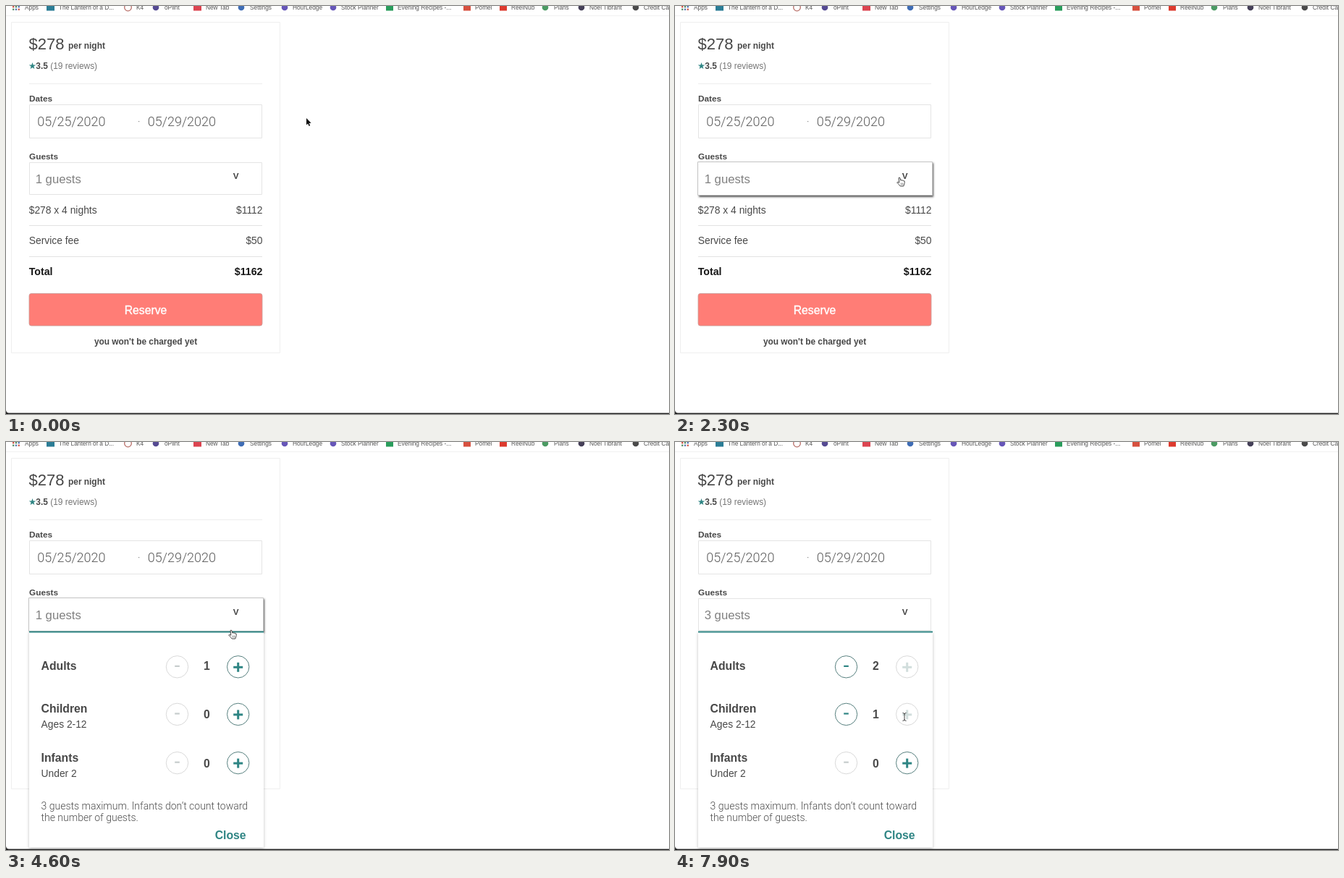
Write an HTML page with a canvas that moves like this. It is 916 px wide and 564 px high and loops after 8000 ms.

```html
<!DOCTYPE html>
<html lang="en">
<head>
<meta charset="utf-8">
<title>Booking card</title>
<style>
  html, body { margin: 0; width: 100%; height: 100%; overflow: hidden; background: #fff; }
  canvas { display: block; }
</style>
</head>
<body>
<canvas id="stage" width="916" height="564"></canvas>
<script>
const ctx = document.getElementById('stage').getContext('2d');
const LOOP = 8000, STEP = 100;
const SANS = '"Liberation Sans", Arial, sans-serif';
const LIGHT = 'Roboto, "Liberation Sans", sans-serif';
const TEAL = '#2f8584', DARK = '#484848';
const OPEN_AT = 3700, ADULT_AT = 5400, CHILD_AT = 7200;

// time, x, y of the pointer hotspot
const PATH = [
  [0, 415, 155], [300, 413, 156], [1200, 226, 218], [1500, 250, 225],
  [2200, 309, 237], [3500, 310, 237], [4000, 310, 240], [4600, 310, 260],
  [5100, 319, 309], [5800, 319, 310], [6400, 317, 342], [6900, 317, 379], [8000, 317, 380]
];

const BOOKMARKS = [
  ['Apps', 26], ['The Lantern of a D...', 73], ['K4', 180], ['oPlint', 219],
  ['New Tab', 276], ['Settings', 337], ['HourLedge', 396], ['Stock Planner', 463],
  ['Evening Recipes -...', 541], ['Pomel', 648], ['ReelNub', 698], ['Plans', 757],
  ['Noel Tibrant', 806], ['Credit Ca', 881]
];
const DOTS = [[207, '#554a92'], [325, '#3f6db5'], [385, '#6656b8'], [452, '#6656b8'],
  [745, '#4b9a63'], [795, '#454058'], [870, '#4a4a4a']];
const SQUARES = [[56, 11, '#2b7d96'], [259, 11, '#dc4450'], [525, 10, '#2a9d5c'],
  [632, 10, '#d7503f'], [682, 10, '#dd3a2e']];

function text(str, x, y, size, color = DARK, weight = 400, align = 'left', family = SANS) {
  ctx.font = `${weight} ${size}px ${family}`;
  ctx.fillStyle = color;
  ctx.textAlign = align;
  ctx.fillText(str, x, y);
}

function fill(x, y, w, h, color) {
  ctx.fillStyle = color;
  ctx.fillRect(x, y, w, h);
}

function frame(x, y, w, h, color) {
  ctx.strokeStyle = color;
  ctx.lineWidth = 1;
  ctx.strokeRect(x + 0.5, y + 0.5, w - 1, h - 1);
}

function disc(x, y, r, color) {
  ctx.beginPath();
  ctx.arc(x, y, r, 0, Math.PI * 2);
  ctx.fillStyle = color;
  ctx.fill();
}

function ring(x, y, r, color, width = 1) {
  ctx.beginPath();
  ctx.arc(x, y, r, 0, Math.PI * 2);
  ctx.strokeStyle = color;
  ctx.lineWidth = width;
  ctx.stroke();
}

function withShadow(color, blur, dx, dy, draw) {
  ctx.save();
  Object.assign(ctx, { shadowColor: color, shadowBlur: blur, shadowOffsetX: dx, shadowOffsetY: dy });
  draw();
  ctx.restore();
}

function polygon(points, x, y) {
  ctx.beginPath();
  points.forEach(([px, py]) => ctx.lineTo(x + px, y + py));
  ctx.closePath();
}

function star(x, y, r) {
  const points = Array.from({ length: 10 }, (_, i) => {
    const a = i * Math.PI / 5 - Math.PI / 2, d = i % 2 ? r * 0.4 : r;
    return [Math.cos(a) * d, Math.sin(a) * d];
  });
  polygon(points, x, y);
  ctx.fillStyle = TEAL;
  ctx.fill();
}

function bookmarkBar() {
  const tints = ['#d2584b', '#5a8f66', '#5577b5'];
  for (let i = 0; i < 6; i++) {
    fill(9 + (i % 3) * 3.8, i < 3 ? 0 : 3.6, 2.3, 2.3, tints[(i + (i > 2)) % 3]);
  }
  DOTS.forEach(([x, color]) => disc(x, 2, 4.3, color));
  SQUARES.forEach(([x, w, color]) => fill(x, 0, w, 6.5, color));
  ring(168.5, 2, 4.8, '#b9706a', 1.3);
  BOOKMARKS.forEach(([label, x]) => text(label, x, 5, 8.3, '#555'));
  fill(0, 13, 916, 1, '#f1f1f1');
}

function header() {
  frame(7, 22, 372, 458, '#efefef');
  text('$278', 31.5, 60, 22);
  text('per night', 86, 59, 11.9, DARK, 700);
  star(36.5, 83, 5);
  text('3.5', 41.3, 86.5, 11.9, DARK, 700);
  text('(19 reviews)', 61.3, 86.5, 11.9, '#767676');
  fill(32, 107, 322, 1, '#ededed');

  text('Dates', 32, 132, 11.8, DARK, 700);
  frame(32, 136, 322, 47, '#e4e4e4');
  text('05/25/2020', 43.3, 166.3, 18, '#5c5c5c', 300, 'left', LIGHT);
  text('05/29/2020', 195.8, 166.3, 18, '#5c5c5c', 300, 'left', LIGHT);
  fill(183, 159, 1.2, 1.2, '#888');
  text('Guests', 32, 212, 11.8, DARK, 700);
}

function priceRow(label, price, y, size = 13.85, color = DARK, weight = 400) {
  text(label, 31.7, y, size, color, weight);
  text(price, 354.5, y, size, color, weight, 'right');
}

function summary() {
  priceRow('$278 x 4 nights', '$1112', 286.5);
  fill(32, 303, 322, 1, '#e2e2e2');
  priceRow('Service fee', '$50', 329);
  fill(32, 346, 322, 1, '#e2e2e2');
  priceRow('Total', '$1162', 372, 14.2, '#181818', 700);

  ctx.beginPath();
  ctx.roundRect(32, 397.5, 322, 44.5, 3);
  ctx.fillStyle = '#ff7d76';
  ctx.fill();
  ctx.strokeStyle = '#c79a96';
  ctx.lineWidth = 0.8;
  ctx.stroke();
  text('Reserve', 193, 426, 15.7, '#fff', 400, 'center');
  ctx.strokeStyle = '#fff';
  ctx.lineWidth = 0.4;
  ctx.strokeText('Reserve', 193, 426);
  text("you won't be charged yet", 193, 468.3, 11.9, DARK, 700, 'center');
}

function guestBox(guests, hover) {
  if (hover) {
    withShadow('#555', 2.5, 1.5, 1.5, () => fill(31.5, 215.5, 324, 46.5, '#fff'));
    frame(31, 215, 325, 47, '#c4c4c4');
  } else {
    frame(32, 216, 322, 45, '#e4e4e4');
  }
  text(`${guests} guests`, 40.7, 244.7, 16.7, '#808080');
  text('V', 317.8, 238.7, 11.8, '#444', 700, 'center');
}

function roundButton(x, y, enabled, plus) {
  ring(x, y, 15.2, enabled ? '#567f7e' : '#d9d9d9');
  const color = enabled ? TEAL : plus ? '#d2dedd' : '#c6cccc';
  if (plus) {
    fill(x - 6.5, y - 1, 13, 3, color);
    fill(x - 1.5, y - 6, 3, 13, color);
  } else {
    fill(x - 3.3, y - 2, 6.6, 2.2, color);
  }
}

function counter(label, note, y, value, canDrop, canAdd) {
  text(label, 48.6, note ? y - 2 : y + 4.3, 15.75, DARK, 700);
  if (note) text(note, 48.6, y + 19, 13.8);
  roundButton(236.5, y, canDrop, false);
  text(value, 277.5, y + (note ? 6 : 4.3), 15.75, DARK, 700, 'center');
  roundButton(320.7, y, canAdd, true);
}

function panel(adults, children) {
  const room = adults + children < 3;
  withShadow('rgba(0,0,0,.25)', 4, 0, 1, () => fill(32, 263, 324, 297.5, '#fff'));
  fill(32, 261.5, 324, 2, TEAL);
  counter('Adults', '', 310.8, adults, adults > 1, room);
  counter('Children', 'Ages 2-12', 376.4, children, children > 0, room);
  counter('Infants', 'Under 2', 443.6, 0, false, true);
  text('3 guests maximum. Infants don’t count toward', 48.5, 508, 14, '#4d4d4d', 300, 'left', LIGHT);
  text('the number of guests.', 48.5, 524, 14, '#4d4d4d', 300, 'left', LIGHT);
  text('Close', 288.7, 548.5, 15.75, TEAL, 700);
}

function bottomEdge() {
  fill(0, 562.6, 916, 1.4, '#222');
  polygon([[0, 0], [0, -4], [1, -1.5], [3.5, 0]], 0, 563);
  ctx.fill();
}

const ARROW = [[0, 0], [0, 9.5], [2.1, 7.6], [3.6, 11], [5.2, 10.3], [3.7, 7], [6.6, 6.8]];
const HAND = [[0, 0.6], [1, 0], [2, 0.8], [2.7, 4], [4, 3.6], [5, 4.2], [6.3, 4],
  [7, 4.8], [8, 5], [8.2, 7.5], [7.4, 10], [6.8, 12], [2.2, 12], [0, 9.4],
  [-2.2, 7.2], [-1.6, 6.2], [0.8, 7.2]];

function arrow(x, y) {
  polygon(ARROW, x, y);
  ctx.strokeStyle = '#fff';
  ctx.lineWidth = 1.4;
  ctx.stroke();
  ctx.fillStyle = '#111';
  ctx.fill();
}

function hand(x, y) {
  polygon(HAND, x, y);
  ctx.fillStyle = '#fff';
  ctx.fill();
  ctx.strokeStyle = '#444';
  ctx.lineWidth = 1;
  ctx.stroke();
  fill(x + 3, y + 7.5, 0.8, 3, '#666');
  fill(x + 5, y + 7.5, 0.8, 3, '#666');
}

function beam(x, y) {
  ctx.strokeStyle = '#444';
  ctx.lineWidth = 1;
  ctx.beginPath();
  for (const side of [-1, 1]) {
    ctx.moveTo(x + 2.5 * side, y - 5.5);
    ctx.quadraticCurveTo(x, y - 5.5, x, y - 3.5);
    ctx.moveTo(x, y + 3.5);
    ctx.quadraticCurveTo(x, y + 5.5, x + 2.5 * side, y + 5.5);
  }
  ctx.moveTo(x, y - 3.5);
  ctx.lineTo(x, y + 3.5);
  ctx.stroke();
}

function pointerAt(t) {
  const i = PATH.findIndex(p => p[0] > t);
  const [t0, x0, y0] = PATH[i - 1], [t1, x1, y1] = PATH[i];
  const u = (t - t0) / (t1 - t0), e = u * u * (3 - 2 * u);
  return [x0 + (x1 - x0) * e, y0 + (y1 - y0) * e];
}

function pointerFor(x, y, hover, open, room) {
  if (hover) return hand;
  const over = cy => Math.hypot(x - 320.7, y - cy) < 15.5;
  if (open && (over(310.8) || over(376.4))) return room ? hand : beam;
  return arrow;
}

function draw(t) {
  const open = t >= OPEN_AT;
  const adults = t >= ADULT_AT ? 2 : 1, children = t >= CHILD_AT ? 1 : 0;
  const guests = adults + children;
  const [x, y] = pointerAt(t);
  const hover = x > 31 && x < 356 && y > 215 && y < 263;

  ctx.lineJoin = 'round';
  fill(0, 0, 916, 564, '#fff');
  bookmarkBar();
  header();
  if (!open) summary();
  guestBox(guests, hover);
  if (open) panel(adults, children);
  bottomEdge();
  pointerFor(x, y, hover, open, guests < 3)(x, y);
}

const start = performance.now();
function tick() {
  const t = (performance.now() - start) % LOOP;
  draw(Math.floor(t / STEP) * STEP);
  requestAnimationFrame(tick);
}
tick();
</script>
</body>
</html>
```
